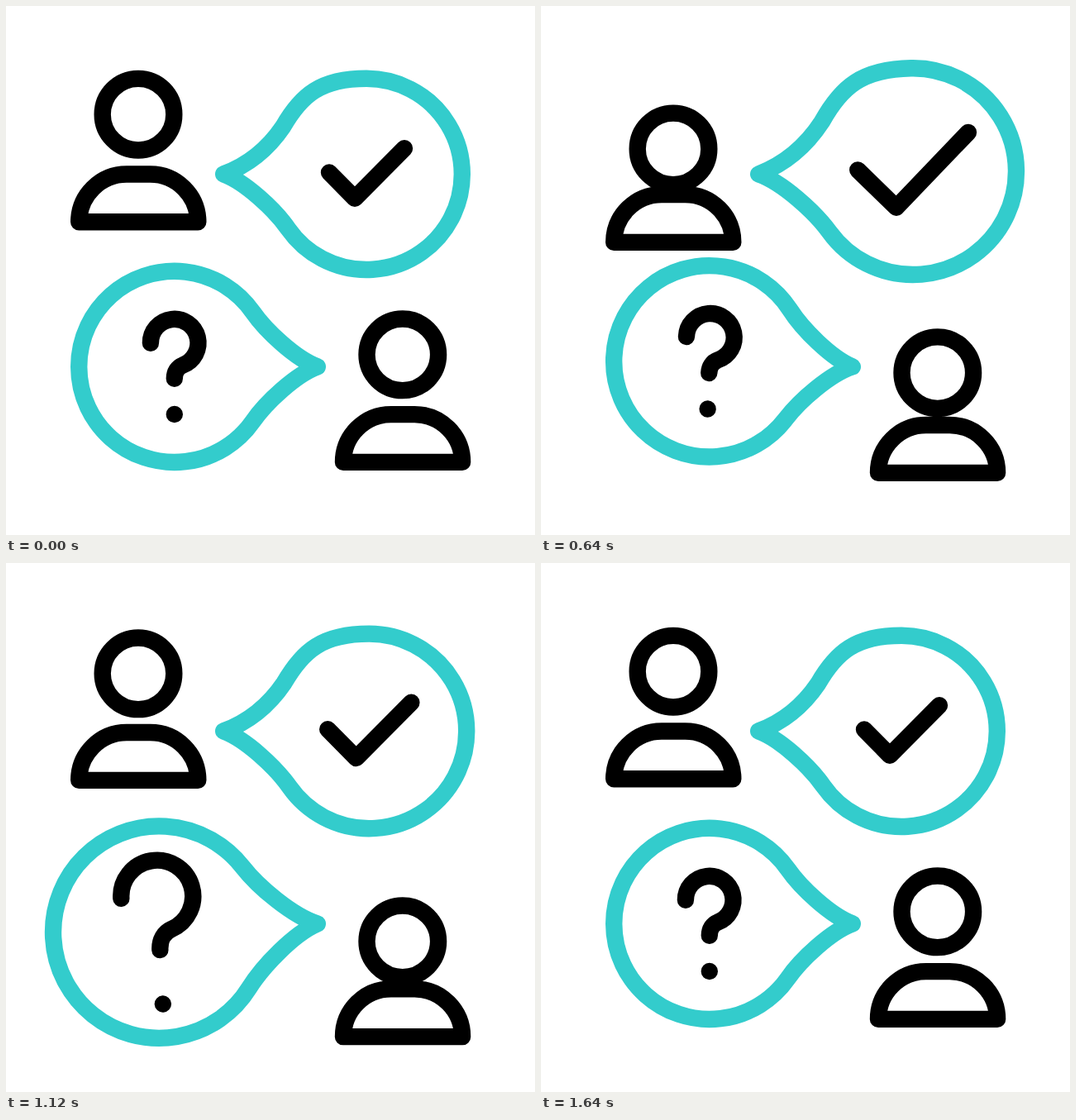
An HTML page for the animation above (1.72 s loop, 640 by 640 pixels).

```html
<!DOCTYPE html>
<html lang="en">
<head>
<meta charset="utf-8">
<title>Question and answer</title>
<style>
  html, body { margin: 0; width: 100%; height: 100%; overflow: hidden; background: #fff; }
  svg { display: block; width: 100%; height: 100%; fill: none; stroke: #000; stroke-width: 20.4;
        stroke-linecap: round; stroke-linejoin: round; }
  path { vector-effect: non-scaling-stroke; }
  .bubble { stroke: #3cc; }
</style>
</head>
<body>
<svg viewBox="0 0 640 640">
  <defs>
    <circle id="face" cx="160" cy="131.2" r="43.3"/>
    <path id="torso" d="M88.2 261.3A57.8 57.8 0 0 1 146 203.5H174.5A57.8 57.8 0 0 1 232.3 261.3Z"/>
  </defs>
  <!-- Bubbles have their tip at 0,0; marks have the bubble centre at 0,0. -->
  <path class="bubble" d="M0 0C26.3 9.6 62.3 43.3 78.3 66.3A115.6 115.6 0 1 0 173 -115.6C117 -115.6 94 -95.4 72 -57.4C50 -25 24 -8.8 0 0Z"/>
  <path class="bubble" d="M0 0C26.3 9.6 62.3 43.3 78.3 66.3A115.6 115.6 0 1 0 78.3 -66.3C62.3 -43.3 26.3 -9.6 0 0Z"/>
  <path class="mark" d="M-45.2 -2L-14.2 29.3L45.8 -31.2"/>
  <path class="mark" d="M-28.9 -28.6A28.8 28.8 0 1 1 9.9 -1.8C4 .6 0 6.2 0 14.3M0 57.6h.01"/>
  <use class="head" href="#face"/>
  <use class="body" href="#torso"/>
  <use class="head" href="#face"/>
  <use class="body" href="#torso"/>
</svg>
<script>
const LOOP = 1720, STEP = 40, CENTER = 173;
const [bubbles, marks, heads, bodies] = ['bubble', 'mark', 'head', 'body']
  .map(name => document.querySelectorAll('.' + name));

const speakers = [
  { delay: 0, x: 0, y: 0, tip: [263.2, 203.4], side: 1, grow: 0.0875, markGrow: 0.52 },
  { delay: 320, x: 319.8, y: 290.6, tip: [376.8, 436.4], side: -1, grow: 0.109, markGrow: 0.51 }
];

// Keys are [time, value] pairs joined by smooth ease-in-out.
const NOD = [[76, 0], [548, 1], [680, 1], [1200, 0]];
const SWELL = [[302, 0], [712, 1], [848, 1], [1236, 0]];
const TILT = [[180, 0], [488, -5.05], [495, -5.05], [785, 3.05], [848, 3.05], [1095, 0]];

function valueAt(keys, t) {
  const next = keys.findIndex(key => key[0] > t);
  if (next < 1) return 0;
  const [t0, v0] = keys[next - 1], [t1, v1] = keys[next];
  const u = (t - t0) / (t1 - t0);
  return v0 + (v1 - v0) * u * u * (3 - 2 * u);
}

const move = (element, transform) => element.setAttribute('transform', transform);

function draw(time) {
  speakers.forEach(({ delay, x, y, tip, side, grow, markGrow }, i) => {
    const t = time - delay;
    const nod = valueAt(NOD, t), swell = valueAt(SWELL, t);
    const scale = 1 + grow * swell;
    const base = `translate(${tip}) rotate(${side * valueAt(TILT, t)})`;
    move(bubbles[i], `${base} scale(${side * scale} ${scale})`);
    move(marks[i], `${base} translate(${side * CENTER * scale}) scale(${1 + markGrow * swell})`);
    move(heads[i], `translate(${x} ${y + 41.7 * nod})`);
    move(bodies[i], `translate(${x} ${y + 24.6 * nod})`);
  });
}

function tick() {
  draw(Math.floor(performance.now() % LOOP / STEP) * STEP);
  requestAnimationFrame(tick);
}
tick();
</script>
</body>
</html>
```
